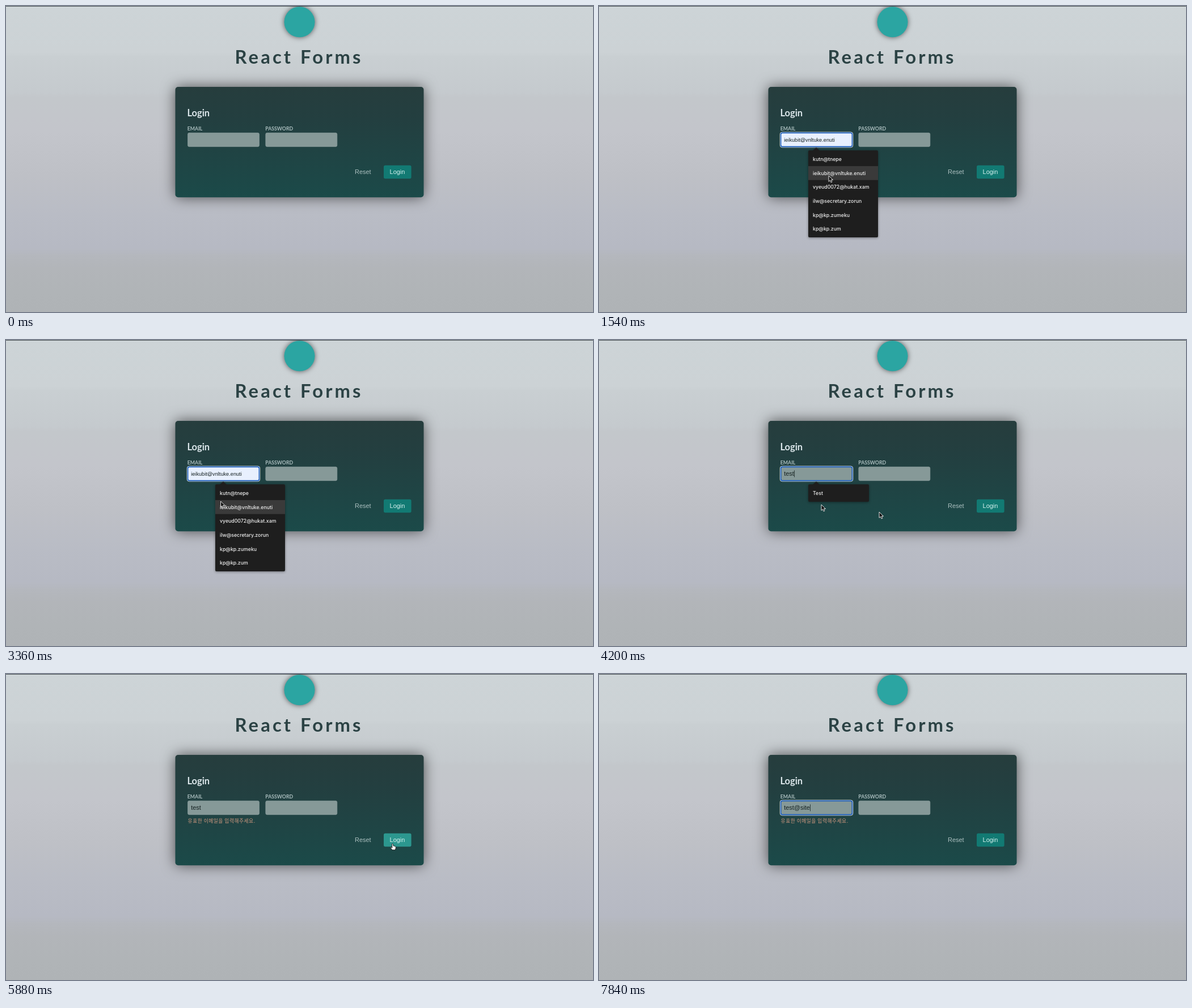
Write an HTML page that moves like this. It is 1035 px wide and 541 px high and loops after 8000 ms.

```html
<!DOCTYPE html>
<html lang="en">
<head>
<meta charset="utf-8">
<title>React Forms</title>
<style>
  html, body { margin: 0; width: 100%; height: 100%; overflow: hidden; }
  body {
    background: linear-gradient(#cdd4d7, #ccd2d5 82px, #c9cfd2 90px, #c5cace 152px, #c3c7cb 162px,
      #c3c5cb 222px, #bec0c6 300px, #b9bcc5 368px, #b6b9c3 428px, #b4b7bd 442px,
      #b2b5b9 464px, #b0b4b7 506px, #afb3b6 541px);
  }
  svg { display: block; width: 1035px; height: 541px; }
  text { white-space: pre; }
  .lato { font-family: Lato, sans-serif; font-weight: 700; }
  .arial { font-family: "Liberation Sans", Arial, sans-serif; font-size: 10.95px; }
  .inter { font-family: Inter, sans-serif; font-size: 8.75px; font-weight: 500; fill: #f0f0f0; }
  .title { font-size: 32.8px; letter-spacing: 4.1px; fill: #2b4244; }
  .label { font-size: 8.76px; fill: #a9bcbd; }
  .input { fill: #869998; stroke: #93a5a4; stroke-width: .6; }
  .error { font: 8.76px "Noto Sans CJK KR", "Noto Sans CJK", sans-serif; letter-spacing: .5px; fill: #d39a80; }
</style>
</head>
<body>
<svg viewBox="0 0 1035 541">
  <defs>
    <linearGradient id="cardFill" x2="0" y2="1">
      <stop stop-color="#263d3d"/>
      <stop offset=".3" stop-color="#233f40"/>
      <stop offset="1" stop-color="#1b4a49"/>
    </linearGradient>
  </defs>
  <rect width="1035" height="1" fill="#4c5356"/>
  <circle cx="517.5" cy="28.3" r="27" fill="#2ba5a2" style="filter:drop-shadow(0 0 5px rgba(0,0,0,.6))"/>
  <text class="lato title" y="102"><tspan x="403.5">React</tspan><tspan x="519">Forms</tspan></text>

  <rect x="298.5" y="143" width="438" height="195.3" rx="5" fill="url(#cardFill)"
    style="filter:drop-shadow(0 0 12px rgba(0,0,0,.6))"/>
  <text class="lato" x="319.4" y="194.5" font-size="16.5" fill="#dbe6ea">Login</text>
  <text class="lato label" x="319.8" y="220">EMAIL</text>
  <text class="lato label" x="457.2" y="220">PASSWORD</text>
  <rect id="email" class="input" x="320.5" y="224.3" width="126" height="24.4" rx="2.6"/>
  <rect class="input" x="457.8" y="224.3" width="126" height="24.4" rx="2.6"/>
  <g id="ring" fill="none">
    <rect x="319.3" y="223.1" width="128.4" height="26.8" rx="3.6" stroke="#eef3f6" stroke-width="1"/>
    <rect x="320.6" y="224.4" width="125.8" height="24.2" rx="2.6" stroke="#1d5fc0" stroke-width="1.6"/>
  </g>
  <text id="value" class="arial" x="326.2" y="240.4" fill="#142020"></text>
  <rect id="caret" y="230.5" width=".8" height="12" fill="#142020"/>
  <text id="error" class="error" x="320.6" y="263">유효한 이메일을 입력해주세요.</text>

  <text class="arial" x="615" y="297.4" fill="#acc0c0">Reset</text>
  <rect id="button" x="666" y="281.7" width="48.6" height="23.6" rx="2.7"/>
  <text class="arial" x="676.6" y="297.4" fill="#d4f1ee">Login</text>

  <g id="menu" style="filter:drop-shadow(0 1px 2px rgba(0,0,0,.4))">
    <path d="M376.5 256L383 250.3L389.5 256Z" fill="#1e1e1e"/>
    <rect id="panel" x="369" y="255.3" rx="2" fill="#1e1e1e"/>
    <rect id="hover" x="369" width="123" height="24.65" fill="#3a3a3a"/>
    <g id="rows"></g>
  </g>

  <g id="click" fill="none">
    <circle r="11.2" fill="rgba(255,255,255,.12)" stroke="#1d2424" stroke-width="1.8"/>
    <circle r="9.8" stroke="#dfe6e6" stroke-width=".8"/>
  </g>
  <g id="arrow">
    <path id="arrowShape" d="M0 0V10.4L2.4 8.2L4 11.9L5.9 11.1L4.3 7.5H7.5Z"
      fill="#151515" stroke="#f4f4f4" stroke-width=".9" stroke-linejoin="round"/>
  </g>
  <use id="trail" href="#arrowShape" x="494" y="304"/>
  <g id="beam" fill="none">
    <path d="M-2.4-5.2Q0-5.2 0-3.4V3.4Q0 5.2-2.4 5.2M2.4-5.2Q0-5.2 0-3.4M0 3.4Q0 5.2 2.4 5.2M-1.4.9H1.4"
      stroke="#f0f0f0" stroke-width="2"/>
    <path d="M-2.4-5.2Q0-5.2 0-3.4V3.4Q0 5.2-2.4 5.2M2.4-5.2Q0-5.2 0-3.4M0 3.4Q0 5.2 2.4 5.2M-1.4.9H1.4"
      stroke="#222" stroke-width=".9"/>
  </g>
  <path id="hand" d="M-1 .6Q0-.6 1 .6L1.5 4L3.2 4.1L4.7 4.7L5.8 5.6V8L4.8 11H-.6L-3.4 7.2Q-3.6 6-2.2 6.3L-.6 7.4Z"
    fill="#fff" stroke="#171717" stroke-width=".9" stroke-linejoin="round"/>
</svg>
<script>
const LOOP = 8000, STEP = 70, ROW = 24.65, ROW_TOP = 258.4;
const $ = id => document.getElementById(id);
const set = (id, attrs) => { for (const k in attrs) $(id).setAttribute(k, attrs[k]); };
const show = (id, on) => { $(id).style.display = on ? "" : "none"; };
const during = (t, spans) => spans.some(([a, b]) => t >= a && t < b);
const lastOf = (t, steps) => steps.reduce((v, s) => (t >= s[0] ? s[1] : v), "");

const MAILS = ["kutn@tnepe", "ieikubit@vnltuke.enuti", "vyeud0072@hukat.xam",
  "ilw@secretary.zorun", "kp@kp.zumeku", "kp@kp.zum"];
const PATH = [
  [70, 492, 414], [280, 420, 300], [420, 340, 192], [700, 417, 232], [1330, 417, 232],
  [1540, 405, 300], [1680, 374, 330], [1750, 325, 330], [2170, 325, 330], [2240, 342, 279],
  [2590, 400, 236], [2660, 400, 236], [2800, 395, 265], [3080, 395, 265], [3360, 378.5, 285],
  [3430, 392, 291], [4200, 392, 291], [4270, 494, 304], [4340, 580, 314], [4760, 580, 314],
  [5250, 682, 301], [5740, 681.5, 300], [5880, 681.5, 300], [6440, 420, 238], [8000, 420, 238]
];
const TYPED = [
  [3570, "t"], [3780, "te"], [3920, "tes"], [4060, "test"], [7000, "test@"],
  [7420, "test@s"], [7630, "test@si"], [7700, "test@sit"], [7840, "test@site"]
];
const FOCUS = [[1120, 1960], [2590, 4480], [6510, LOOP]];
const MAIL_MENU = [[1120, 1960], [2660, 3570]];
const TEST_MENU = [[3570, 4480], [6580, 7000]];
const CLICKS = [[1050, 1120], [1890, 1960], [2590, 2660], [4410, 4620], [5390, 5740], [6440, 6510]];

function pointer(t) {
  const i = Math.max(1, PATH.findIndex(p => p[0] >= t));
  const [t0, x0, y0] = PATH[i - 1], [t1, x1, y1] = PATH[i];
  const k = Math.max(0, (t - t0) / (t1 - t0));
  return [x0 + (x1 - x0) * k, y0 + (y1 - y0) * k];
}

let shownRows = "";
function fillRows(items) {
  if (shownRows === items.join()) return;
  shownRows = items.join();
  $("rows").innerHTML = items.map((s, i) =>
    `<text class="inter" x="377" y="${274.1 + ROW * i}">${s}</text>`).join("");
}

function draw(t) {
  const [x, y] = pointer(t);
  const visible = t >= 70 && t < 7490;
  const focused = during(t, FOCUS), mails = during(t, MAIL_MENU), tests = during(t, TEST_MENU);

  const items = mails ? MAILS : tests ? ["Test"] : [];
  const row = mails && x >= 369 && x < 492 ? Math.floor((y - ROW_TOP) / ROW) : -1;
  const picked = row >= 0 ? MAILS[row] : "";
  show("menu", items.length);
  fillRows(items);
  set("panel", { width: mails ? 123 : 107, height: mails ? 153.7 : 30.7 });
  show("hover", picked);
  set("hover", { y: ROW_TOP + ROW * Math.max(row, 0) });

  $("email").style.fill = picked ? "#e8f0fe" : "";
  const value = $("value");
  value.textContent = picked || lastOf(t, TYPED);
  value.style.fontSize = picked ? "9.2px" : "";
  show("ring", focused);
  show("caret", focused && !picked);
  set("caret", { x: 326.4 + (value.textContent ? value.getComputedTextLength() : 0) });
  show("error", t >= 5390);

  const onButton = x > 666 && x < 714.6 && y > 281.7 && y < 305.3;
  const onField = x > 320 && x < 447 && y > 224 && y < 249;
  set("button", { fill: onButton ? "#2c978f" : "#127a73" });
  const shape = onButton ? "hand" : onField ? "beam" : "arrow";
  for (const id of ["arrow", "beam", "hand"]) show(id, visible && id === shape);
  for (const id of [shape, "click"]) set(id, { transform: `translate(${x} ${y})` });
  show("click", during(t, CLICKS));
  show("trail", during(t, [[4200, 4270]]));
}

function tick() {
  const t = performance.now() % LOOP;
  draw(Math.min(Math.floor(t / STEP) * STEP, 7840));
  requestAnimationFrame(tick);
}
tick();
</script>
</body>
</html>
```
